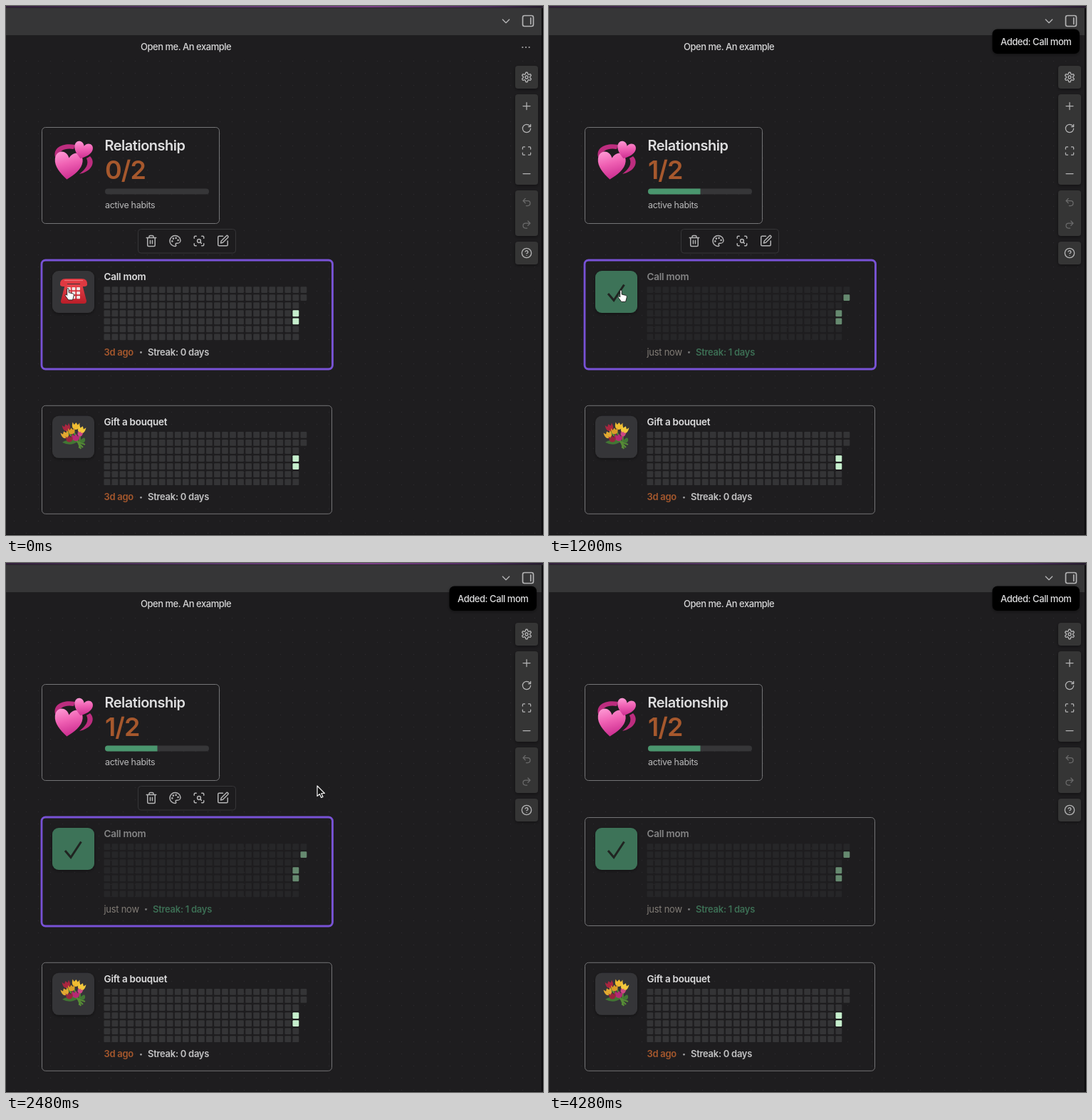
An HTML page for the animation above (4320 ms loop, 754 by 743 pixels).

```html
<!DOCTYPE html>
<html lang="en">
<head>
<meta charset="utf-8">
<title>Habit canvas</title>
<style>
  html, body { margin: 0; width: 100%; height: 100%; overflow: hidden; background: #1e1d1f; }
  svg { display: block; width: 754px; height: 743px; font-family: Inter, Roboto, sans-serif; }
  .icon { fill: none; stroke: #b4b4b5; stroke-width: 2; stroke-linecap: round; stroke-linejoin: round; }
  .title { font-size: 13.5px; font-weight: 600; letter-spacing: -.23px; }
  .meta { font-size: 13px; letter-spacing: -.28px; }
  .bold { font-weight: 600; }
  .frame { fill: none; stroke: #747476; }
  .done .cell { fill: #262628; }
  .done .hit { fill: #668a70; }
  .cell { fill: #343436; }
  .hit { fill: #c6efcd; }
</style>
</head>
<body>
<svg id="stage" viewBox="0 0 754 743" xmlns="http://www.w3.org/2000/svg">
  <defs>
    <pattern id="dots" width="17" height="17" x="3" y="1" patternUnits="userSpaceOnUse">
      <circle cx="8.5" cy="8.5" r=".7" fill="#2b2a2d"/>
    </pattern>
    <linearGradient id="strip">
      <stop offset="0" stop-color="#33203b"/><stop offset=".4" stop-color="#5d3a6d"/>
      <stop offset=".68" stop-color="#7b3f86"/><stop offset=".9" stop-color="#4b2a5c"/>
      <stop offset="1" stop-color="#241a2c"/>
    </linearGradient>
    <linearGradient id="pink" x1="0" y1="0" x2=".4" y2="1">
      <stop offset="0" stop-color="#ffa0d8"/><stop offset=".5" stop-color="#f062b4"/>
      <stop offset="1" stop-color="#cf3193"/>
    </linearGradient>
    <linearGradient id="red" x1="0" y1="0" x2="0" y2="1">
      <stop offset="0" stop-color="#e8434a"/><stop offset="1" stop-color="#b91d28"/>
    </linearGradient>
    <filter id="soft" x="-20%" y="-20%" width="140%" height="150%">
      <feDropShadow dx="0" dy="1.5" stdDeviation="2" flood-color="#000" flood-opacity=".4"/>
    </filter>
    <path id="heart" d="M0 1C-.5.65-1 .2-1-.35C-1-1-.25-1.1 0-.5C.25-1.1 1-1 1-.35C1 .2.5.65 0 1Z" fill="url(#pink)"/>
  </defs>

  <rect width="754" height="743" fill="#1e1d1f"/>
  <rect y="76" width="754" height="667" fill="url(#dots)"/>
  <rect width="754" height="41" fill="#363637"/>
  <rect width="754" height="2" fill="url(#strip)"/>
  <rect y="2" width="754" height="1" fill="#2a272c"/>
  <text x="189" y="62" font-size="13" font-weight="500" letter-spacing="-.48" fill="#d6d6d7">Open me. An example</text>
  <g id="controls"></g>

  <g id="summary">
    <rect class="frame" x="50.5" y="170.5" width="249" height="135" rx="5"/>
    <path d="M69 212C66 199 79 192 97 195L95 201C83 199 75 203 73 211Z" fill="#bd2d7f"/>
    <path d="M118 211C127 220 119 233 103 236C112 229 117 222 113 214Z" fill="#bd2d7f"/>
    <use href="#heart" transform="translate(87.5 223.5) rotate(6) scale(19.5 20)"/>
    <use href="#heart" transform="translate(108 202.5) rotate(16) scale(13 12.2)"/>
    <text x="138.5" y="203" font-size="20" letter-spacing="-.5" class="bold" fill="#dededf">Relationship</text>
    <text id="count" x="139" y="243" font-size="36" letter-spacing="-.9" class="bold" fill="#a6582d"></text>
    <rect x="139" y="256.5" width="146" height="8" rx="4" fill="#363638"/>
    <path id="bar" d="M212.500 256.500H143a4 4 0 0 0 0 8H212.500Z" fill="#4a966e"/>
    <text x="139" y="284" font-size="12.5" letter-spacing="-.32" fill="#b9b9ba">active habits</text>
  </g>

  <g id="cards"></g>

  <g id="selection">
    <rect x="50" y="357" width="408.500" height="153" rx="5.500" fill="none" stroke="#7852d6" stroke-width="2.800"/>
    <rect x="185.500" y="313.500" width="137" height="33.500" rx="4" fill="#1d1c1e" stroke="#363638"/>
    <g id="tools"></g>
  </g>

  <g id="notice">
    <rect x="622.500" y="32.500" width="122.500" height="34.500" rx="7" fill="#050506" filter="url(#soft)"/>
    <text x="634" y="54.500" font-size="13" font-weight="500" letter-spacing="-.45" fill="#dededf">Added: Call mom</text>
  </g>

  <path d="M753 3V743" stroke="#0c0b0d" stroke-width="2"/>
  <path d="M0 742.500H754" stroke="#141315"/>

  <g id="cursor">
    <path id="hand" d="M3.200 1.400C3.200-.4 5.700-.4 5.700 1.400V6L11 7.300C12.700 7.800 13 8.800 12.700 10.200L11.800 14L11 16.400H5.200L1 10.800C0 9.200 1.600 8 2.600 9.200L3.200 9.900Z" fill="#fff" stroke="#151515" stroke-width=".9"/>
    <path id="arrow" d="M0 0V14.500L3.400 11.400L5.600 16.400L8 15.400L5.800 10.500H10.400Z" fill="#111" stroke="#f2f2f2" stroke-width="1.200" stroke-linejoin="round"/>
  </g>
</svg>

<script>
const $ = id => document.getElementById(id);
const LOOP = 4320, STEP = 40;
const PRESS = 720, CLICK = 920, DESELECT = 2520;

const circle = (x, y, r, attrs = '') => `<circle cx="${x}" cy="${y}" r="${r}" ${attrs}/>`;
const path = (d, attrs = '') => `<path d="${d}" ${attrs}/>`;
const box = (x, y, w, h, r, attrs) => `<rect x="${x}" y="${y}" width="${w}" height="${h}" rx="${r}" ${attrs}/>`;

// Icons live on a 24 x 24 grid and are placed by their centre.
const gear = 'M' + Array.from({ length: 72 }, (_, i) => {
  const a = i * Math.PI / 36;
  const r = 8.6 + 1.6 * Math.max(-1, Math.min(1, 1.8 * Math.cos(6 * a)));
  return `${(12 + r * Math.sin(a)).toFixed(2)} ${(12 - r * Math.cos(a)).toFixed(2)}`;
}).join('L') + 'Z';
const undo = 'M9 14 4 9l5-5M4 9h10.5a5.5 5.5 0 0 1 0 11H11';
const spot = (x, y) => circle(x, y, .7);

const shapes = {
  chevron: path('m5 9 7 7 7-7'),
  panel: box(3, 3, 18, 18, 3, '') + path('M16.500 7v10'),
  more: circle(5, 12, .6) + circle(12, 12, .6) + circle(19, 12, .6),
  gear: path(gear) + circle(12, 12, 3),
  plus: path('M4 12h16M12 4v16'),
  reload: path('M21 12a9 9 0 1 1-9-9c2.5 0 4.9 1 6.700 2.700L21 8M21 3v5h-5'),
  expand: path('M8 3H5a2 2 0 0 0-2 2v3M21 8V5a2 2 0 0 0-2-2h-3M3 16v3a2 2 0 0 0 2 2h3M16 21h3a2 2 0 0 0 2-2v-3'),
  minus: path('M4 12h16'),
  undo: path(undo),
  redo: path(undo, 'transform="matrix(-1 0 0 1 24 0)"'),
  help: circle(12, 12, 10) + path('M9.100 9a3 3 0 0 1 5.800 1c0 2-3 3-3 3M12 17h.01'),
  trash: path('M3 6h18M19 6v14a2 2 0 0 1-2 2H7a2 2 0 0 1-2-2V6M8 6V4a2 2 0 0 1 2-2h4a2 2 0 0 1 2 2v2M10 11v6M14 11v6'),
  palette: path('M12 2a10 10 0 0 0 0 20c1 0 1.700-.8 1.700-1.700 0-1-.9-1.200-.9-2.300a1.600 1.600 0 0 1 1.600-1.600h2c3 0 5.600-2.500 5.600-5.500C22 6 17.500 2 12 2z')
    + spot(13.5, 6.5) + spot(17.5, 10.5) + spot(8.5, 7.5) + spot(6.5, 12.5),
  scan: path('M3 7V5a2 2 0 0 1 2-2h2M17 3h2a2 2 0 0 1 2 2v2M21 17v2a2 2 0 0 1-2 2h-2M7 21H5a2 2 0 0 1-2-2v-2M16.500 16.500l-2.200-2.200') + circle(12, 12, 3.2),
  edit: path('M12 3H5a2 2 0 0 0-2 2v14a2 2 0 0 0 2 2h14a2 2 0 0 0 2-2v-7M18.400 2.600a2.100 2.100 0 0 1 3 3L12 15l-4 1 1-4z')
};
const icon = (name, x, y, size = 15, alpha = 1) =>
  `<g class="icon" opacity="${alpha}" transform="translate(${x} ${y}) scale(${size / 24}) translate(-12 -12)">${shapes[name]}</g>`;

const panel = (y, h) => box(715, y, 32, h, 4, 'fill="#343435" filter="url(#soft)"');
$('controls').innerHTML =
  icon('chevron', 702, 21, 16) + icon('panel', 733, 21, 20) + icon('more', 730, 58, 16)
  + panel(84, 32) + panel(124, 127) + panel(259, 64) + panel(331, 32)
  + icon('gear', 731, 100, 16) + icon('plus', 731, 140.5) + icon('reload', 731, 172)
  + icon('expand', 731, 203.5) + icon('minus', 731, 235.5)
  + icon('undo', 731, 275.5, 15, .42) + icon('redo', 731, 307, 15, .42) + icon('help', 731, 347, 16);
$('tools').innerHTML = ['trash', 'palette', 'scan', 'edit']
  .map((name, i) => icon(name, 204 + i * 33.5, 330, 18)).join('');

function phone() {
  let out = path('M83 391H107L113 414Q113 418 109.500 418H80.500Q76.500 418 77 414Z', 'fill="url(#red)"')
    + path('M76 392Q75 383 84 383H106Q115 383 114 392Q113 394 110 394H107Q104 394 104 390H86Q86 394 83 394H80Q77 394 76 392Z', 'fill="#df3941"')
    + path('M82 385.500H108', 'stroke="#f0767a" stroke-width="1.200"');
  for (let i = 0; i < 9; i++)
    out += box(86 + i % 3 * 6.6, 395 + Math.floor(i / 3) * 6, 4.8, 4.2, .8, 'fill="#eee5e3"');
  return out;
}

// Tulips: x, y, radius, colour
const tulips = [
  [85, 592, 5, '#a92640'], [98, 590, 5, '#f0bc32'], [92, 597, 4.5, '#d99b27'],
  [106, 595, 5, '#f3c83c'], [83, 602, 5, '#e2a931'], [98, 606, 5, '#b62a75'],
  [89, 608, 4.5, '#97253d'], [104, 601, 3.5, '#ce4786']
];
function bouquet() {
  const stems = path('M86 598L108 620M94 595L105 622M104 600L103 621M84 606L111 616', 'stroke="#568b36" stroke-width="2.200" fill="none"')
    + path('M79 613Q90 606 100 612Q91 619 79 613ZM103 611Q112 602 111 611Q108 617 103 611Z', 'fill="#427634"');
  return stems + tulips.map(([x, y, r, c]) =>
    path(`M${-r} ${-r}L${-r / 2} ${-r / 3}L0 ${-r}L${r / 2} ${-r / 3}L${r} ${-r}Q${r * 1.3} ${r} 0 ${r}Q${-r * 1.3} ${r} ${-r} ${-r}Z`,
      `fill="${c}" transform="translate(${x} ${y}) rotate(${(x - 95) * 2})"`)).join('');
}

function cells(done) {
  let out = '';
  for (let col = 0; col < 26; col++)
    for (let row = 0; row < (col < 25 ? 7 : 2); row++) {
      const hit = (col === 24 && (row === 3 || row === 4)) || (done && col === 25 && row === 1);
      out += box((137.5 + col * 11.04).toFixed(2), (394.2 + row * 11.05).toFixed(2), 8.8, 8.8, 1.2, `class="${hit ? 'hit' : 'cell'}"`);
    }
  return out;
}

function content(title, done, tile) {
  const [ago, agoFill, streakX, streak, streakFill] = done
    ? ['just now', '#817c76', 206, 'Streak: 1 days', '#3c6e54']
    : ['3d ago', '#a6582d', 199, 'Streak: 0 days', '#c3c3c4'];
  return `${tile}<text class="title" x="137.500" y="385" fill="${done ? '#848485' : '#dededf'}">${title}</text>`
    + cells(done)
    + `<text class="meta${done ? '' : ' bold'}" x="137.500" y="490.500" fill="${agoFill}">${ago}</text>`
    + circle(streakX - 9.5, 486.5, 1.4, `fill="${done ? '#777778' : '#a0a0a1'}"`)
    + `<text class="meta bold" x="${streakX}" y="490.500" fill="${streakFill}">${streak}</text>`;
}

const tile = (fill, inner, id = '') =>
  `<g ${id}>${box(65, 372, 59, 59, 9, `fill="${fill}" filter="url(#soft)"`)}${inner}</g>`;
const frame = '<rect class="frame" x="50.500" y="357.500" width="407" height="152" rx="5"/>';
const rim = box(65.5, 372.5, 58, 58, 9, 'id="rim" fill="none" stroke="#4b4b4d"');
const check = path('M83 404L91 413.500L105.500 391.500', 'fill="none" stroke="#202421" stroke-width="3"');

$('cards').innerHTML =
  `<g>${frame}<g id="todo">${content('Call mom', false, tile('#363638', phone() + rim, 'id="button"'))}</g>`
  + `<g id="done" class="done">${content('Call mom', true, tile('#3d7358', check))}</g></g>`
  + `<g transform="translate(0 203.800)">${frame}${content('Gift a bouquet', false,
    tile('#363638', `<g transform="translate(0 -203.800)">${bouquet()}</g>`))}</g>`;

// Pointer keys: time, x, y
const route = [
  [0, 82.5, 396.5], [480, 96.5, 399], [1280, 96.5, 399], [1840, 435, 313], [2080, 435, 313],
  [2400, 437, 313], [3120, 437, 313], [3560, 560, -24], [LOOP, 560, -24]
];
function pointer(t) {
  const i = route.findIndex(key => key[0] > t);
  const [t0, x0, y0] = route[i - 1], [t1, x1, y1] = route[i];
  const u = (t - t0) / (t1 - t0), k = u * u * (3 - 2 * u);
  return [x0 + (x1 - x0) * k, y0 + (y1 - y0) * k];
}

const show = (id, on) => $(id).setAttribute('visibility', on ? 'visible' : 'hidden');

function render(t) {
  const added = t >= CLICK, pressed = t >= PRESS && !added;
  const fade = Math.max(0, Math.min(1, (t - CLICK) / 120));
  $('count').textContent = added ? '1/2' : '0/2';
  show('bar', added);
  show('notice', added);
  show('selection', t < DESELECT);
  show('rim', pressed);
  $('todo').setAttribute('opacity', 1 - fade);
  $('done').setAttribute('opacity', fade);
  $('button').setAttribute('transform', pressed ? 'translate(94.500 401.500) scale(.97) translate(-94.500 -401.500)' : '');
  const [x, y] = pointer(t), overButton = x < 118;
  $('cursor').setAttribute('transform', `translate(${x.toFixed(2)} ${y.toFixed(2)})`);
  show('hand', overButton);
  show('arrow', !overButton);
}

const start = performance.now();
function tick() {
  const t = (performance.now() - start) % LOOP;
  render(Math.floor(t / STEP) * STEP);
  requestAnimationFrame(tick);
}
tick();
</script>
</body>
</html>
```
